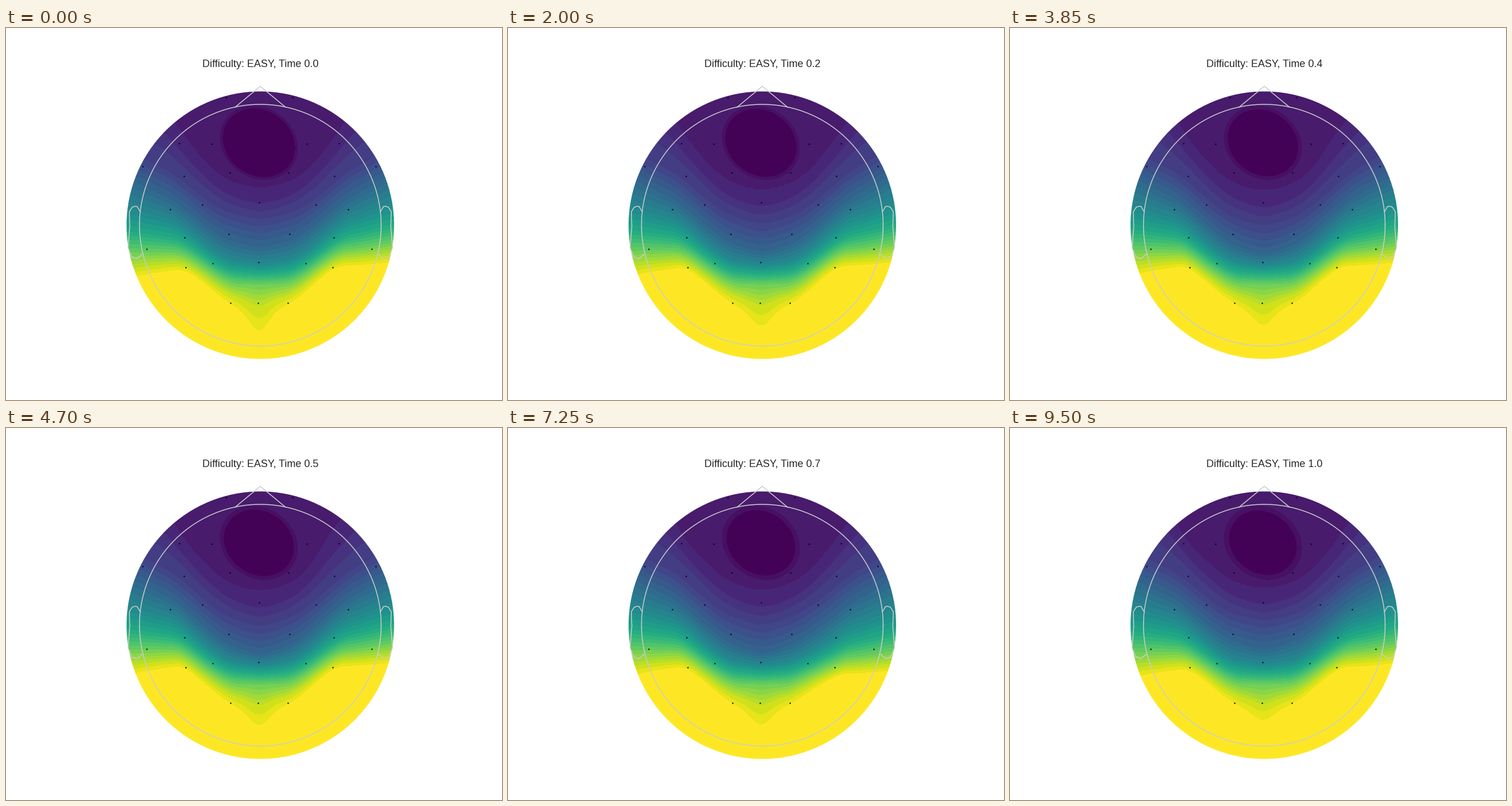
Write a matplotlib script that moves like this. It is 864 by 648 pixels and loops after 10000 ms.

```python
import numpy as np
import matplotlib.pyplot as plt
from matplotlib.animation import FuncAnimation
from matplotlib.patches import Circle

plt.rcParams["font.family"] = "Liberation Sans"
W, H, DPI = 864, 648, 108
STEP, LOOP = 50, 10000
CX, CY, MAP_R, HEAD_R = 443, 343.5, 233, 210.5
LINE = dict(color="0.8", lw=1, solid_joinstyle="round")

# Bursts of change: first ms, last ms, steps
BURSTS = [(500, 800, 5), (1150, 1150, 1), (1350, 1700, 4), (2000, 2900, 8),
          (3100, 4000, 7), (4300, 4700, 5), (5000, 5000, 1), (5350, 6200, 8),
          (6450, 7350, 7), (7500, 8000, 5), (8350, 8900, 6), (9250, 9500, 5)]
TICKS = np.concatenate([[0]] + [
    np.ceil(np.linspace(a, b, n) / STEP) * STEP for a, b, n in BURSTS])

xs = np.arange(CX - MAP_R - 6, CX + MAP_R + 7, 3.0)
ys = np.arange(CY - MAP_R - 6, CY + MAP_R + 7, 3.0)
X, Y = np.meshgrid(xs, ys)
side = (xs - CX) / MAP_R
reach = np.abs(xs - CX)

# Each contour level is a curve: depth on the midline, an S-bend, an outer slope
LEVELS = np.arange(3, 30)
KEYS = [3, 4, 6, 10, 14, 18, 23, 27, 29]
DEPTH = np.interp(LEVELS, KEYS, [279, 306, 333, 383, 411, 428, 447, 468, 484])
BEND = np.interp(LEVELS, KEYS, [25, 25, 30, 30, 45, 45, 50, 60, 70])
SLOPE = np.interp(LEVELS, KEYS, [224, 175, 95, 97, 58, 35, 14, 0, -8])
TIP = np.interp(LEVELS, [23, 27, 29], [0, 16, 44])


def bump(v, centre, width):
    return np.exp(-((v - centre) / width) ** 2)


def smoothstep(v):
    v = np.clip(v, 0, 1)
    return v * v * (3 - 2 * v)


def contour(i, level):
    power = 1.4 + 0.6 * np.exp((3 - level) / 1.5)
    return (DEPTH[i]
            - BEND[i] * smoothstep((reach - 60 + level) / 117)
            - SLOPE[i] * np.abs(side) ** power
            - (5 + 10 * (level / 29) ** 4) * side ** 3
            + TIP[i] * bump(xs, 441, 26))


BASE = np.array([contour(i, level) for i, level in enumerate(LEVELS)])


def drift(s):
    """Vertical shift of every curve at loop position s."""
    top = bump(LEVELS, 3, 1)
    tip = -10 * (1 - np.exp(-s / 0.1)) - 16 * s ** 12
    parts = [
        (14 * np.sin(np.pi * s) ** 0.8, bump(LEVELS, 8, 5), bump(xs, 441, 80)),
        (12 * s, top, bump(xs, 312, 28)),
        (-18 * bump(s, 0.47, 0.15), top, bump(xs, 570, 32)),
        (tip, bump(LEVELS, 29, 1.5), bump(xs, 441, 24)),
        (-6 * np.sin(np.pi * s), LEVELS / 29, smoothstep((345 - xs) / 50)),
        (14 * bump(s, 0.73, 0.15), np.clip(LEVELS / 15, 0, 1),
         smoothstep((xs - 500) / 80)),
    ]
    return sum(size * np.outer(weight, shape) for size, weight, shape in parts)


# Tilted ellipse of the frontal minimum
tilt = np.radians(35)
dx, dy = X - 440.5, Y - 200
RHO = np.hypot((dx * np.cos(tilt) + dy * np.sin(tilt)) / 64,
               (dy * np.cos(tilt) - dx * np.sin(tilt)) / 55)


def field(t):
    s = t / LOOP
    rows = BASE + drift(s)
    rows = np.vstack([np.full_like(xs, -300), rows, rows[-1] + 20])
    rows = np.maximum.accumulate(rows, axis=0)
    values = np.concatenate([[2.1], LEVELS, [31]])
    z = np.column_stack([np.interp(ys, col, values) for col in rows.T])
    inner = 1.04 - 0.07 * s
    core = 1 + (RHO - inner) / (1.12 - inner)
    z = np.where(RHO < 1.4, np.minimum(z, core), z)
    return np.clip(z, 0.2, 29.8)


fig = plt.figure(figsize=(W / DPI, H / DPI), dpi=DPI, facecolor="white")
ax = fig.add_axes([0, 0, 1, 1])
ax.set_xlim(0, W)
ax.set_ylim(H, 0)
ax.axis("off")

# Head outline, nose and ears
disc = Circle((CX, CY), MAP_R, transform=ax.transData)
ang = np.linspace(0, 2 * np.pi, 181)
ax.plot(CX + HEAD_R * np.cos(ang), CY + HEAD_R * np.sin(ang), **LINE)
ax.plot([399, CX, 487], [138, 101.5, 138], **LINE)
ear_x = 2 * HEAD_R * np.array([.497, .510, .518, .5299, .5419, .54, .547,
                               .532, .510, .489])
ear_y = CY - 2 * HEAD_R * np.array([.0555, .0775, .0783, .0746, .0555, -.0055,
                                    -.0932, -.1313, -.1384, -.1199])
for sign in (-1, 1):
    ax.plot(CX + sign * ear_x, ear_y, **LINE)

# Sensors: left half mirrored, then the midline
left = [(383, 120.5), (302, 201), (358, 202), (238, 240.5), (310, 258),
        (390, 252), (286, 316), (342, 308), (388, 359), (311, 365),
        (245, 384.5), (360, 410), (313, 417), (391, 479)]
sensors = left + [(882 - x, y) for x, y in left]
sensors += [(441, 304), (440, 408), (439, 479)]
ax.plot(*zip(*sensors), "o", color="black", ms=1.6, mew=0)

title = ax.text(CX, 68, "", ha="center", va="baseline", fontsize=12,
                color="0.15")
shown = {"t": None, "map": None}


def update(i):
    t = TICKS[TICKS <= i * STEP].max()
    if t != shown["t"]:
        if shown["map"] is not None:
            shown["map"].remove()
        shown["map"] = ax.contourf(X, Y, field(t), levels=np.arange(31),
                                   cmap="viridis", vmin=0.35, vmax=29.6,
                                   zorder=1)
        shown["map"].set_clip_path(disc)
        ax.set_xlim(0, W)
        ax.set_ylim(H, 0)
        title.set_text(f"Difficulty: EASY, Time {int(t / 1000 + 0.5) / 10:.1f}")
        shown["t"] = t
    return [shown["map"], title]


anim = FuncAnimation(fig, update, frames=LOOP // STEP, interval=STEP,
                     repeat=True, repeat_delay=0, blit=False)
plt.show()
```
